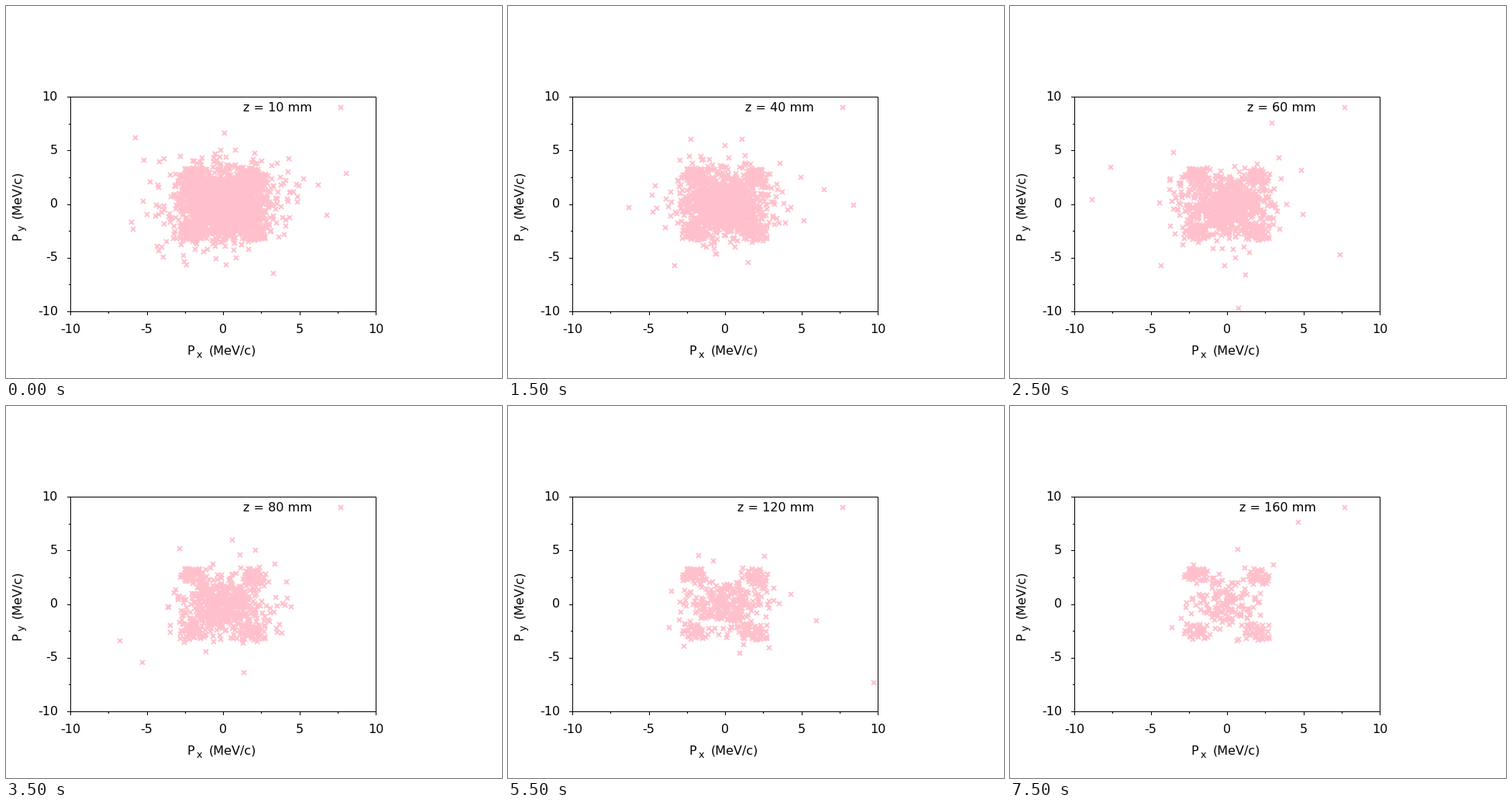
Animation of 640x480 px, one loop 8000 ms. Source, as a matplotlib script:

```python
import numpy as np
import matplotlib.pyplot as plt
from matplotlib.animation import FuncAnimation

W, H, DPI = 640, 480, 100
PX = 72 / DPI
FRAMES, STEP = 16, 500
PINK = "#ffc0cb"
L, R, T, B = 83, 477, 117, 394
X0, Y0 = (L + R) / 2, (T + B) / 2
SX, SY = (R - L) / 20, (B - T) / 20


def gauss(rng, n, sx, sy, cx=X0, cy=Y0):
    return rng.normal((cx, cy), (sx, sy), (round(n), 2))


def make_corners():
    """Four persistent clumps, cut off at a sharp outer edge."""
    rng = np.random.default_rng(5)
    groups = []
    for sx in (-1, 1):
        for sy in (-1, 1):
            cx, cy = X0 + 1.95 * SX * sx, Y0 + 2.6 * SY * sy
            p = gauss(rng, 400, 8.5, 7, cx, cy)
            off = np.abs(p - (cx, cy))
            groups.append(p[(off[:, 0] < 17) & (off[:, 1] < 11)])
    return groups


CORNERS = make_corners()


def cloud(k):
    z = 10 * (k + 1)
    rng = np.random.default_rng(100 + k)
    n = 2130 * np.exp(-z / 60)
    wide = 0.6 - 0.002 * z
    loose = np.vstack([
        gauss(rng, n * (1 - wide), 20, 16),
        gauss(rng, n * wide, 31, 22),
        gauss(rng, 300 * np.exp(-z / 35) + 8, 46, 31),
        gauss(rng, 18 * np.exp(-z / 60) + 2, 90, 62),
    ])
    inside = np.abs(loose - (X0, Y0)) < ((R - L) / 2 - 4, (B - T) / 2 - 4)
    held = round(40 + 80 * np.exp(-z / 50))
    return np.vstack([loose[inside.all(axis=1)],
                      *(c[:held] for c in CORNERS)])


fig = plt.figure(figsize=(W / DPI, H / DPI), dpi=DPI, facecolor="white")
ax = fig.add_axes([0, 0, 1, 1])
ax.set_xlim(0, W)
ax.set_ylim(H, 0)
ax.axis("off")


def text(x, y, s, size=16, **kw):
    return ax.text(x, y, s, fontsize=size * PX, family="DejaVu Sans",
                   color="black", va="baseline", zorder=5, **kw)


def line(xs, ys):
    ax.plot(xs, ys, color="black", lw=PX, solid_capstyle="projecting",
            solid_joinstyle="miter", zorder=4)


def crosses(xs, ys):
    return ax.plot(xs, ys, "x", color=PINK, ms=6 * PX, mew=2 * PX,
                   zorder=3)[0]


line([L, R, R, L, L], [T, T, B, B, T])
for i in range(-4, 5):
    v = 2.5 * i
    x, y = X0 + SX * v, Y0 - SY * v
    size = 2 if i % 2 else 4
    line([L - size, L], [y, y])
    line([x, x], [B, B + size])
    if i % 2 == 0:
        text(67, y + 4.7, f"{v:.0f}", ha="right")
        text(x, 422, f"{v:.0f}", ha="center")

text(233.4, 450, "P")
text(245.6, 454, "x", 12.8)
text(262, 450, "(MeV/c)")
up = dict(rotation=90, rotation_mode="anchor")
text(19, 302.5, "P", **up)
text(24, 290, "y", 12.8, **up)
text(19, 273.5, "(MeV/c)", **up)

title = text(395, 136, "", ha="right")
marks = crosses([], [])
crosses([431.6], [130.6])


def draw(k):
    title.set_text(f"z = {10 * (k + 1)} mm")
    marks.set_data(*cloud(k).T)
    return title, marks


anim = FuncAnimation(fig, draw, frames=FRAMES, interval=STEP, repeat=True,
                     repeat_delay=0, blit=False)
plt.show()
```
